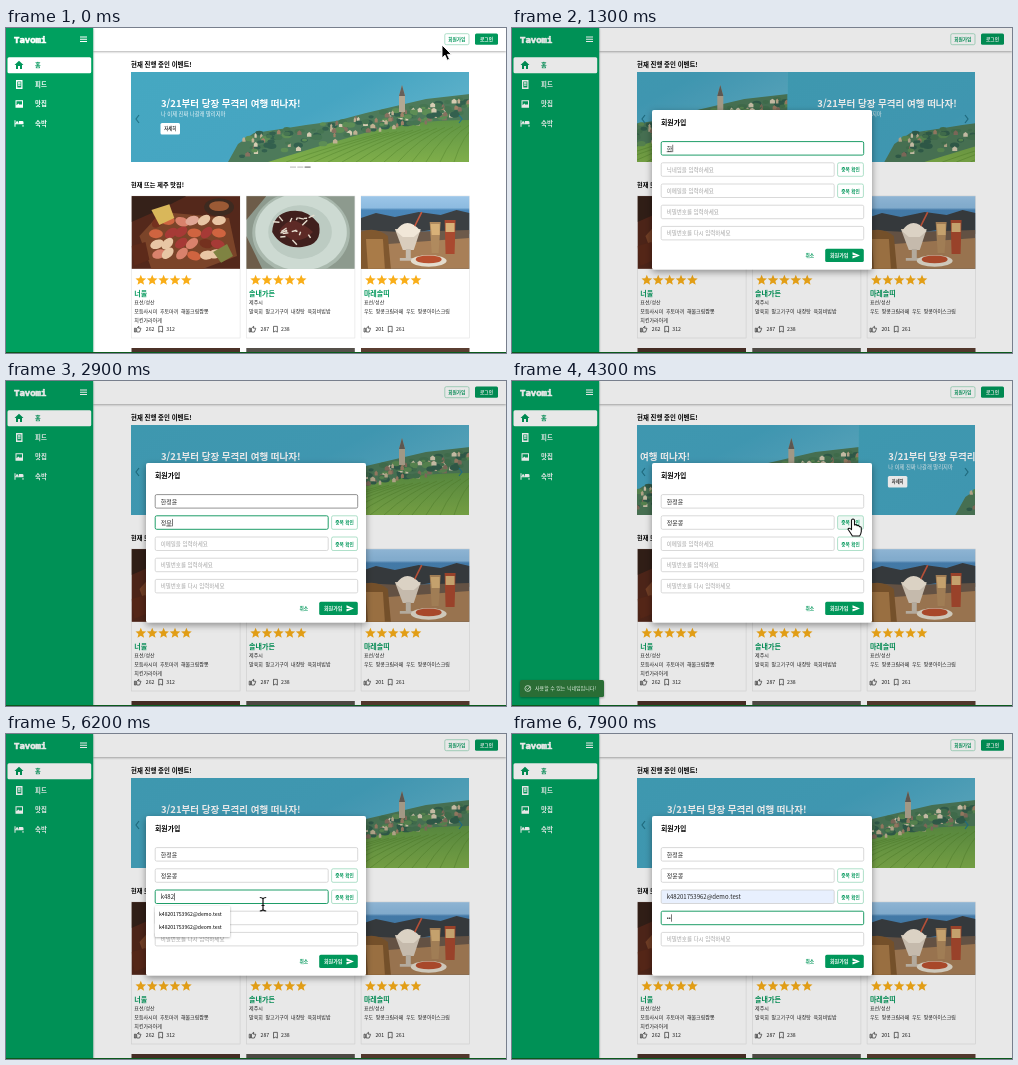
Animation of 500x325 px, one loop 8000 ms. Source, as an HTML page:

```html
<!DOCTYPE html>
<html lang="ko">
<head>
<meta charset="utf-8">
<title>회원가입</title>
<style>
html, body { margin: 0; width: 100%; height: 100%; overflow: hidden; background: #fff; }
svg { display: block; }
#stage { width: 500px; height: 325px; font: 500 5px "Noto Sans CJK KR", "Noto Sans CJK", "Noto Sans", sans-serif; }
.bold { font-weight: 700; }
.heavy { font-weight: 900; }
.mid { text-anchor: middle; }
.green { fill: #00975a; }
.white { fill: #fff; }
.line { fill: none; stroke: #222; stroke-width: 2; stroke-linejoin: round; }
.outlined { fill: #fff; stroke: #8fd3b4; stroke-width: .7; }
#logo { font-family: "Noto Sans Mono", monospace; stroke: #fff; stroke-width: .6; }
#track { animation: slide 8s linear infinite; }
#modal { animation: open 8s linear infinite; }
#snack { animation: toast 8s linear infinite; }
#cursor { animation: move 8s ease-in-out infinite; }
@keyframes slide {
  0%, 20.51%, 58.64%, 96.76%, 100% { transform: none; }
  14.25%, 52.375%, 90.5% { transform: none; animation-timing-function: ease; }
  20.5%, 58.63%, 96.75% { transform: translateX(-338px); }
}
@keyframes open {
  0%, 2.5% { opacity: 0; }
  5.3%, 100% { opacity: 1; }
}
@keyframes toast {
  0%, 51.3%, 64%, 86.6%, 96.5%, 100% { opacity: 0; }
  53.2%, 62%, 88.5%, 94.5% { opacity: 1; }
}
@keyframes move {
  0% { transform: translate(436px, 17px); }
  2%, 3.75% { transform: translate(450px, 12px); }
  7.25%, 43.75% { transform: translate(200px, 126px); }
  47.5%, 56.25% { transform: translate(341px, 138px); }
  61.25%, 75.6% { transform: translate(257px, 163px); }
  77.5%, 79.4% { transform: translate(257px, 170px); }
  81%, 82.5% { transform: translate(210px, 180px); }
  85%, 87.5% { transform: translate(341px, 160px); }
  90.6%, 100% { transform: translate(230px, 185px); }
}
</style>
</head>
<body>
<svg id="stage" viewBox="0 0 500 325">
  <defs>
    <linearGradient id="lake" x1="0" x2="1" y2=".5">
      <stop stop-color="#45a8c1"/><stop offset=".6" stop-color="#46a5c2"/><stop offset="1" stop-color="#62b3cb"/>
    </linearGradient>
    <linearGradient id="vine" x2="0" y2="1">
      <stop stop-color="#5f9445"/><stop offset="1" stop-color="#7fae4a"/>
    </linearGradient>
    <linearGradient id="sea" x2="0" y2="1">
      <stop stop-color="#9cc6e8"/><stop offset=".16" stop-color="#8dbbe0"/><stop offset=".19" stop-color="#4a86b8"/><stop offset="1" stop-color="#40759f"/>
    </linearGradient>
    <filter id="soft" x="-10%" y="-10%" width="120%" height="120%"><feGaussianBlur stdDeviation=".7"/></filter>
    <filter id="shade" x="-20%" y="-20%" width="140%" height="150%"><feDropShadow dx="0" dy="2.5" stdDeviation="3.5" flood-opacity=".4"/></filter>
    <filter id="low" x="-20%" y="-20%" width="140%" height="160%"><feDropShadow dx="0" dy=".8" stdDeviation="1" flood-opacity=".35"/></filter>
    <clipPath id="frame"><rect x="125" y="44" width="338" height="89.5"/></clipPath>
  </defs>

  <rect width="500" height="325" fill="#fff"/>

  <!-- carousel -->
  <text class="heavy" x="125" y="39" font-size="6.4">현재 진행 중인 이벤트!</text>
  <g clip-path="url(#frame)"><g id="track">
    <g id="banner">
      <rect x="125" y="44" width="338.5" height="90" fill="url(#lake)"/>
      <path d="M222 134 L232 116 248 105 275 101 300 97 330 93 360 85 390 78 420 71 464 66 V134Z" fill="#4d7a5a"/>
      <path d="M262 134 Q320 116 362 104 T464 92 V134Z" fill="url(#vine)"/>
      <g id="rows" stroke="#55862f" stroke-width=".7" fill="none" opacity=".7"></g>
      <g id="village"></g>
      <path d="M393 84 V68 L396 57 399 68 V84Z" fill="#b3a893"/>
      <path d="M393 68 L396 57 399 68Z" fill="#66605a"/>
      <g class="white">
        <text class="bold" x="155" y="79" font-size="9.5">3/21부터 당장 무격리 여행 떠나자!</text>
        <text x="155" y="88" font-size="5.3" font-weight="400" opacity=".9">나 이제 진짜 나갈래 말리지마</text>
        <rect x="154.5" y="95" width="19.5" height="11.5" rx="1.5"/>
      </g>
      <text class="mid bold" x="164.3" y="102.4" font-size="4.3" fill="#333">자세히</text>
    </g>
    <use href="#banner" x="338"/>
  </g></g>
  <g fill="none" stroke="#23758a" stroke-width="1.2"><path d="M133 87 L130 91 133 95"/><path d="M453 87 L456 91 453 95"/></g>
  <g fill="#c4c4c4"><rect x="284" y="138.5" width="6" height="1.2"/><rect x="291.3" y="138.5" width="6" height="1.2"/><rect x="298.6" y="138.5" width="6" height="1.2" fill="#777"/></g>

  <!-- cards -->
  <text class="heavy" x="125" y="158.5" font-size="6.2">현재 뜨는 제주 맛집!</text>
  <g id="cards"></g>
  <svg x="125.5" y="168" width="108.5" height="73" viewBox="0 0 109 73"><g filter="url(#soft)">
    <rect width="109" height="73" fill="#54281b"/>
    <path d="M0 0 H55 L32 12 0 26Z" fill="#352119"/>
    <path d="M8 40 L30 16 98 22 106 60 72 73 H20Z" fill="#7b4429"/>
    <ellipse cx="88" cy="11" rx="15" ry="9" fill="#3d2a20"/><ellipse cx="88" cy="10" rx="10" ry="5" fill="#9b5a35"/>
    <g id="slices"></g>
    <path d="M20 14 L38 8 43 22 28 29Z" fill="#d9b75a"/>
    <path d="M0 50 L14 46 18 64 3 70Z" fill="#5d2a1a"/>
    <path d="M82 56 L96 48 102 60 90 67Z" fill="#7f8342"/>
  </g></svg>
  <svg x="240.3" y="168" width="108.5" height="73" viewBox="0 0 109 73"><g filter="url(#soft)">
    <rect width="109" height="73" fill="#8d9a8e"/>
    <path d="M0 40 L16 73 H0Z M0 0 H20 L0 24Z" fill="#6d5c49"/>
    <ellipse cx="55" cy="37" rx="49" ry="42" fill="#a9b8ad"/><ellipse cx="55" cy="36" rx="46" ry="39" fill="#cddad2"/>
    <ellipse cx="54" cy="36" rx="32" ry="27" fill="#bccbc2"/>
    <path d="M26 36 Q27 18 44 15 T73 28 Q77 49 56 51 T26 36Z" fill="#40201d"/>
    <path d="M33 35 Q42 21 52 26 T67 36 Q58 46 46 44Z" fill="#5d2a26"/>
    <g id="strips" stroke="#e6ded0" stroke-width="1.4"></g>
  </g></svg>
  <svg x="355" y="168" width="108.5" height="73" viewBox="0 0 109 73"><g filter="url(#soft)">
    <rect width="109" height="73" fill="url(#sea)"/>
    <path d="M0 22 L15 17 34 21 58 16 80 19 96 14 109 17 V38 L70 34 40 39 0 34Z" fill="#3b3f42"/>
    <path d="M0 34 L40 36 109 34 V73 H0Z" fill="#6d5a4a"/>
    <path d="M0 50 L109 42 V73 H0Z" fill="#a87f57"/>
    <path d="M0 36 Q14 30 27 40 L30 73 H0Z" fill="#80582f"/><path d="M5 43 H22 L24 73 H7Z" fill="#a97b48"/>
    <path d="M34 33 H60 L53 54 H42Z" fill="#d9cdbd"/><path d="M35 35 Q46 19 60 35 L53 41 H42Z" fill="#f1e7d8"/>
    <path d="M45 53 H50 V62 H56 V65 H39 V62 H45Z" fill="#c5bbad"/>
    <path d="M54 30 L61 16" stroke="#c9583e" stroke-width="1.6"/>
    <path d="M69 26 H80 L78 57 H71Z" fill="#b08a5e"/><path d="M84 24 H95 L94 58 H85Z" fill="#a9492f"/>
    <path d="M70 28 H79 V39 H71Z M85 27 H94 V36 H85Z" fill="#d8b178"/>
    <ellipse cx="68" cy="65" rx="18" ry="6" fill="#e3dccd"/><ellipse cx="68" cy="63.5" rx="13" ry="4" fill="#b9502f"/>
  </g></svg>
  <g fill="#4b3128"><rect x="125.5" y="320" width="108.5" height="5"/><rect x="240.3" y="320" width="108.5" height="5" fill="#55504a"/><rect x="355" y="320" width="108.5" height="5" fill="#5a3d31"/></g>

  <!-- header and drawer -->
  <rect x="87" width="413" height="23" fill="#fff" filter="url(#low)"/>
  <rect class="outlined" x="438.8" y="5.7" width="24.2" height="11" rx="1.5"/>
  <text class="mid green bold" x="450.8" y="12.9" font-size="4.7">회원가입</text>
  <rect class="green" x="469" y="5.5" width="23" height="11.3" rx="1.5"/>
  <text class="mid white bold" x="480.5" y="12.9" font-size="4.7">로그인</text>
  <rect width="87.2" height="325" fill="#00a05e" filter="url(#low)"/>
  <rect class="white" x="1.5" y="29.3" width="83.7" height="16" rx="1.5"/>
  <g class="green">
    <path d="M13 32.8 L17.5 37 H16 V41 H14 V38 H12 V41 H10 V37 H8.5Z"/>
    <text class="heavy" x="29" y="39.4" font-size="6.2">홈</text>
  </g>
  <g class="white">
    <text id="logo" class="heavy" x="8" y="14.7" font-size="9">Tavomi</text>
    <path d="M74 8.5h7v1h-7z M74 10.7h7v1h-7z M74 12.9h7v1h-7z"/>
    <path fill-rule="evenodd" d="M10 52h6.5v9H10z M11.3 53.6h4v5.8h-4z M12 54.3h2.6v1.4H12z M12 56.6h2.6v1.2H12z"/>
    <path fill-rule="evenodd" d="M9.5 72.3h7.5v7.5H9.5z M10.5 73.3v4l2-1.7 1.5 1.5 1-1 1 1v-3.8z"/>
    <path d="M8.5 92.3h1v4h8v-2q0-1.3-1.3-1.3H13v2.3H9.5v3.5h-1z M16.5 97h1v1.8h-1z"/><circle cx="11.2" cy="94.4" r="1.2"/>
    <g class="heavy" font-size="6.4"><text x="29" y="59">피드</text><text x="29" y="78.4">맛집</text><text x="29" y="98">숙박</text></g>
  </g>

  <!-- sign-up dialog -->
  <g id="modal">
    <rect width="500" height="325" opacity=".09"/>
    <rect x="140" y="82" width="220" height="159.5" rx="2" fill="#fff" filter="url(#shade)"/>
    <text class="heavy" x="149" y="97" font-size="6.9">회원가입</text>
    <g id="fields"></g>
    <rect id="caret" width=".6" height="7.4" fill="#222"/>
    <text class="mid green bold" x="297.8" y="229" font-size="4.7">취소</text>
    <rect class="green" x="313.2" y="220.8" width="38.6" height="13.2" rx="1.6"/>
    <text class="white bold" x="318" y="229.2" font-size="5">회원가입</text>
    <path class="white" d="M340.5 224.2 L348 227.4 340.5 230.6 V228.1 L345 227.4 340.5 226.7Z"/>
    <g id="hints">
      <rect x="149" y="172" width="75" height="31" rx="1" fill="#fff" filter="url(#low)"/>
      <text x="153" y="182" font-size="5.1">k48201753962@demo.test</text>
      <text x="153" y="195.4" font-size="5.1">k48201753962@deom.test</text>
    </g>
  </g>

  <g id="snack">
    <rect x="8" y="299" width="84" height="17" rx="1.6" fill="#2a6d35" filter="url(#low)"/>
    <circle cx="15.8" cy="307.5" r="2.9" fill="none" stroke="#e4f0e4" stroke-width=".7"/>
    <path d="M14.3 307.5 L15.5 308.7 18.2 305.6" fill="none" stroke="#e4f0e4" stroke-width=".7"/>
    <text id="notice" x="23" y="309.4" font-size="5" fill="#e4f0e4"></text>
  </g>
  <rect y="324" width="500" height="1" fill="#0b5a1c"/>

  <g id="cursor" stroke-linejoin="round">
    <path id="arrow" d="M0 0 V13 L3 10.2 5.2 15.2 7.5 14.2 5.3 9.4 H9.4Z" stroke="#fff" stroke-width=".9"/>
    <path id="hand" d="M-1.5 1 Q0-1 1.5 1 V6 Q3.5 5 4 6.6 Q6 6 6.3 7.6 Q8.3 7.4 8.3 9.3 V12.5 Q8 15 6.6 17 H-.6 Q-3 13 -5 10.2 Q-4.3 8 -1.5 10.6Z" fill="#fff" stroke="#111" stroke-width="1.1"/>
    <path id="beam" d="M-3.2-6.5 Q-.5-6.5 0-5 Q.5-6.5 3.2-6.5 M0-5 V5.5 M-3.2 7 Q-.5 7 0 5.5 Q.5 7 3.2 7 M-1.5 1.5H1.5" fill="none" stroke="#111" stroke-width="1.2"/>
  </g>
</svg>

<script>
const $ = id => document.getElementById(id);
const fill = (id, n, draw) => { $(id).innerHTML = Array.from({ length: n }, (_, i) => draw(i)).join(''); };
let seed = 7;
const rnd = () => (seed = seed * 16807 % 2147483647) / 2147483647;
const pick = list => list[Math.floor(rnd() * list.length)];

// scenery and food details
fill('rows', 13, i => `<path d="M${280 + i * 14} 134 Q${325 + i * 11} ${118 - i} ${375 + i * 8} ${105 - i * .7}"/>`);
fill('village', 200, i => {
  const x = 236 + rnd() * 226;
  const shore = 108 - (x - 236) * .17;
  const y = shore + rnd() * (x < 330 ? 22 : 17);
  const w = 2 + rnd() * 3.2;
  return i % 5 < 3
    ? `<ellipse cx="${x}" cy="${y}" rx="${w}" ry="${w * .6}" fill="${pick(['#33604e', '#467552', '#5d8d55'])}"/>`
    : `<path d="M${x} ${y}v3h${w}v-3l${-w / 2}-1.8z" fill="${pick(['#c0b193', '#a08268', '#d6ccb2', '#877160'])}"/>`;
});
fill('slices', 24, i => {
  const x = 24 + i % 6 * 12 + rnd() * 4, y = 24 + Math.floor(i / 6) * 11 + rnd() * 3;
  return `<ellipse cx="${x}" cy="${y}" rx="7" ry="4.5" transform="rotate(${rnd() * 70 - 45} ${x} ${y})" fill="${pick(['#d9826c', '#e0a795', '#a63a36', '#e8c6a4', '#cf6440', '#74311f'])}"/>`;
});
fill('strips', 18, () => {
  const x = 33 + rnd() * 32, y = 21 + rnd() * 24;
  return `<path d="M${x} ${y}l${rnd() * 14 - 7} ${rnd() * 10 - 5}"/>`;
});

const star = Array.from({ length: 10 }, (_, i) => {
  const r = i % 2 ? 2.5 : 5.6, a = i * Math.PI / 5;
  return `${r * Math.sin(a)},${-r * Math.cos(a)}`;
}).join(' ');
const places = [
  ['너울', '표선/성산', ['모듬사시미 후토마끼 해물크림짬뽕', '치킨가라아게'], 262, 312],
  ['솔내가든', '제주시', ['말육회 말고기구이 내장탕 육회비빔밥'], 287, 238],
  ['마레솔띠', '표선/성산', ['우도 땅콩크림라떼 우도 땅콩아이스크림'], 201, 261]
];
fill('cards', 3, i => {
  const [name, area, menu, likes, saves] = places[i];
  const stars = [0, 1, 2, 3, 4].map(n => `<polygon points="${star}" transform="translate(${9.5 + n * 11.4} 252.3)" fill="#f9ae19"/>`).join('');
  const dishes = menu.map((m, n) => `<text x="3" y="${284.6 + n * 9}" word-spacing="1.2">${m}</text>`).join('');
  return `<g transform="translate(${125.3 + i * 114.8} 0)" fill="#222">
    <rect x=".2" y="168" width="108.6" height="142" fill="#fff" stroke="#e2e2e2" stroke-width=".6"/>${stars}
    <text class="heavy green" x="3" y="268" font-size="7">${name}</text>
    <text x="3" y="276.4">${area}</text>${dishes}
    <path class="line" transform="translate(2.5 297.3) scale(.32)" d="M9 21h9l4-10V9h-7l1-6-7 6z M2 9h4v12H2z"/>
    <text x="14.5" y="303.2" font-size="5.2">${likes}</text>
    <path class="line" transform="translate(25.5 297.4) scale(.32)" d="M6 3h12v18l-6-3-6 3z"/>
    <text x="35" y="303.2" font-size="5.2">${saves}</text></g>`;
});

// form fields
const hints = ['이름을 입력하세요', '닉네임을 입력하세요', '이메일을 입력하세요', '비밀번호를 입력하세요', '비밀번호를 다시 입력하세요'];
const top0 = 113.6, step = 21.2;
fill('fields', 5, i => {
  const y = top0 + i * step, check = i === 1 || i === 2;
  return `<rect id="box${i}" x="149.2" y="${y}" width="${check ? 173 : 202.5}" height="13.5" rx="1.5"/>
    <text id="text${i}" x="154.7" y="${y + 8.9}"></text>` + (check ?
    `<rect id="check${i}" class="outlined" x="325.6" y="${y}" width="25.8" height="13.5" rx="1.5"/>
    <text class="mid green bold" x="338.5" y="${y + 8.5}" font-size="4.7">중복 확인</text>` : '');
});

// every script is a list of [time in ms, value]
const keys = (start, gap, words) => words.split(' ').map((w, i) => [start + i * gap, w]);
const typed = [
  keys(1080, 100, 'ㅎ 하 한 한ㅈ 한저 한정 한정ㅇ 한정유 한정윤'),
  keys(2440, 110, 'ㅈ 저 정 정ㅇ 정유 정윤 정윤ㅋ 정윤코 정윤콩'),
  [...keys(5560, 170, 'k k4 k48 k482'), [6540, 'k48201753962@demo.test']],
  keys(7600, 170, '• ••'),
  []
];
const focus = [[780, 0], [2250, 1], [3960, -1], [4980, 2], [6840, -1], [7340, 3]];
const hover = [[560, 0], [3560, 1], [3700, -1], [4800, 2], [6400, -1], [7150, 3]];
const pointer = [[0, 'arrow'], [130, 'hand'], [350, 'arrow'], [560, 'beam'], [950, ''], [3500, 'beam'], [3720, 'hand'],
  [4650, 'beam'], [5450, ''], [6000, 'beam'], [6400, 'arrow'], [6720, 'hand'], [7080, 'beam'], [7500, '']];
const at = (list, t, none) => list.reduce((v, [time, value]) => t >= time ? value : v, none);
const show = (el, on) => { el.style.display = on ? '' : 'none'; };

function draw() {
  const t = performance.now() % 8000;
  const active = at(focus, t, -1), over = at(hover, t, -1), kind = at(pointer, t, '');
  typed.forEach((list, i) => {
    const value = at(list, t, ''), box = $('box' + i), text = $('text' + i);
    const on = active === i;
    box.setAttribute('stroke', on ? '#1f9d68' : over === i ? '#666' : '#c9c9c9');
    box.setAttribute('stroke-width', on ? 1 : .7);
    box.setAttribute('fill', i === 2 && t >= 6540 ? '#e8f0fe' : '#fff');
    text.setAttribute('fill', value ? '#222' : '#a2a2a2');
    text.setAttribute('font-size', value ? 6 : 5.5);
    const last = value.slice(-1);
    text.innerHTML = on && i < 2 && value
      ? `${value.slice(0, -1)}<tspan text-decoration="underline">${last}</tspan>` : value || hints[i];
    if (on) {
      $('caret').setAttribute('x', 155 + (value ? text.getComputedTextLength() : 0));
      $('caret').setAttribute('y', top0 + i * step + 3.1);
    }
  });
  const typing = typed.some(list => list.some(([time]) => t >= time && t < time + 350));
  show($('caret'), active >= 0 && (typing || t % 1000 < 500));
  show($('hints'), t >= 5560 && t < 6540);
  $('check1').style.fill = kind === 'hand' && t > 3700 && t < 4700 ? '#eff8f4' : '';
  $('check2').style.fill = kind === 'hand' && t > 6700 ? '#eff8f4' : '';
  $('notice').textContent = `사용할 수 있는 ${t < 6000 ? '닉네임' : '이메일'}입니다!`;
  for (const id of ['arrow', 'hand', 'beam']) show($(id), id === kind);
  requestAnimationFrame(draw);
}
draw();
</script>
</body>
</html>
```
